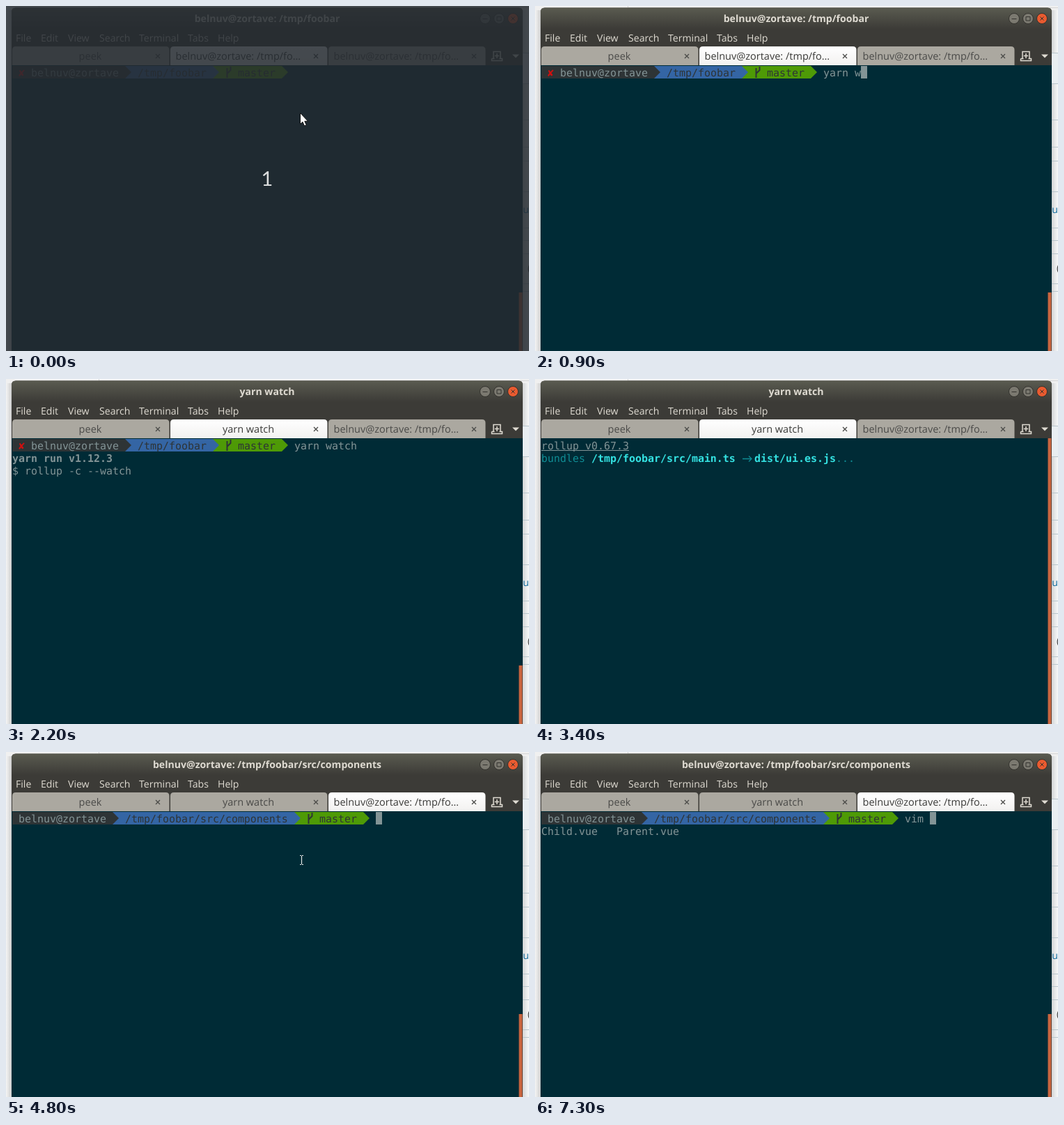
These frames come from a looping animation (751x495 px, 8000 ms). An HTML page:

```html
<!DOCTYPE html>
<html lang="en">
<head>
<meta charset="utf-8">
<title>Terminal session</title>
<style>
  html, body { margin: 0; width: 100%; height: 100%; overflow: hidden; background: #fdfdfd; }
  svg { display: block; width: 751px; height: 495px; }
  text { white-space: pre; text-rendering: geometricPrecision; }
  .ui { font: 14.1px "Open Sans", "Noto Sans", sans-serif; fill: #dfdbd2; }
  .title { font-weight: 700; text-anchor: middle; }
  .tab { font-size: 14.5px; fill: #4a4a48; }
  .on { fill: #3a3a38; }
  .mid { text-anchor: middle; }
  .count { font: 29px Lato, sans-serif; fill: #dcdedf; }
  .mono { font: 14.95px "DejaVu Sans Mono", monospace; fill: #839496; }
  .bold { font-weight: 700; }
</style>
</head>
<body>
<svg viewBox="0 0 751 495">
  <defs>
    <linearGradient id="bar" x2="0" y2="1">
      <stop offset="0" stop-color="#5a5b50"/><stop offset="1" stop-color="#3c3b37"/>
    </linearGradient>
    <linearGradient id="active" x2="0" y2="1">
      <stop offset="0" stop-color="#fff"/><stop offset="1" stop-color="#f2f1f0"/>
    </linearGradient>
    <linearGradient id="shadeL">
      <stop offset="0" stop-color="#f4f4f4"/><stop offset="1" stop-color="#cfcfcf"/>
    </linearGradient>
    <linearGradient id="shadeR">
      <stop offset="0" stop-color="#d4d6d7"/><stop offset="1" stop-color="#f7f8f8"/>
    </linearGradient>
  </defs>

  <rect width="751" height="495" fill="#f0f0f0"/>
  <path d="M133.500 0V2.500H751" fill="none" stroke="#d4d4d4"/>
  <rect y="6" width="8" height="489" fill="url(#shadeL)"/>
  <rect x="742" y="6" width="9" height="489" fill="url(#shadeR)"/>
  <g id="page"></g>
  <text class="ui" x="735.500" y="297" style="fill:#0b6a9c">su</text>
  <text class="ui" x="749" y="381" style="fill:#444">(</text>

  <path d="M8 495V8.500q0-6 6-6H736q6 0 6 6V495z" fill="#3c3b37"/>
  <path d="M8 33V8.500q0-6 6-6H736q6 0 6 6V33z" fill="url(#bar)"/>
  <g stroke="#33322e">
    <circle cx="688" cy="18" r="7.500" fill="#7b7970"/>
    <circle cx="708" cy="18" r="7.500" fill="#7b7970"/>
    <circle cx="728" cy="18" r="7.500" fill="#ea5b30"/>
    <path d="M684.500 18.500h7M705 15.500h6v5.500h-6zM725.500 15.500l5 5m0-5l-5 5" fill="none"/>
  </g>
  <g fill="none" stroke="#dfdbd2" stroke-width="1.500">
    <path d="M700 76V65.500h10V76M697.500 75.500v3h15v-3h-4M697.500 75.500h4M705 68v7M701.800 71.500h6.400"/>
    <path d="M727 69.500h10l-5 5z" fill="#dfdbd2" stroke="none"/>
  </g>
  <g id="tabs"></g>
  <rect x="8" y="85" width="734" height="410" fill="#002b36"/>
  <g id="screen"></g>
  <g id="head"></g>
  <g id="veil">
    <rect width="751" height="495" fill="#252b31" opacity=".85"/>
    <text x="375" y="258" class="count mid">1</text>
  </g>
  <g id="pointer"></g>
</svg>

<script>
const $ = id => document.getElementById(id);
const LOOP = 8000, CELL = 9, LINE = 18, LEFT = 9, TOP = 86;
const USER = 'belnuv@zortave';
const GREY = '#839496', DARK = '#2e3436', BLUE = '#3465a4', GREEN = '#4e9a06',
      TEAL = '#0f8c94', CYAN = '#34e2e2', LIME = '#8ae234';
const colX = c => LEFT + c * CELL;
const rowY = r => TOP + r * LINE;

const label = (x, y, s, cls = '') => `<text class="ui ${cls}" x="${x}" y="${y}">${s}</text>`;
const mono = (col, row, s, fill = GREY, cls = '') =>
  `<text class="mono ${cls}" x="${colX(col)}" y="${rowY(row) + 15}" style="fill:${fill}">${s}</text>`;
const rect = (x, y, w, h, fill) =>
  `<rect x="${x}" y="${y}" width="${w}" height="${h}" fill="${fill}"/>`;

// Prompt segment: a box that ends in an arrow tip one cell wide
const segment = (from, to, fill) => {
  const a = colX(from), b = colX(to);
  return `<path d="M${a} ${TOP}H${b}l9 9l-9 9H${a}z" fill="${fill}"/>`;
};

function prompt(path, failed) {
  const name = failed ? 3 : 1;
  const dir = name + USER.length + 3;
  const git = dir + path.length + 3;
  const x = colX(git);
  const svg = segment(0, git + 9, GREEN) + segment(0, git - 2, BLUE) + segment(0, dir - 2, DARK) +
    (failed ? mono(1, 0, '✘', '#d01010', 'bold') : '') +
    mono(name, 0, USER) + mono(dir, 0, path, DARK) + mono(git + 2, 0, 'master', DARK) +
    `<path d="M${x + 2.5} 103V89m5-2v5l-5 5" fill="none" stroke="${DARK}" stroke-width="2"/>`;
  return { svg, end: git + 11 };
}

const root = prompt('/tmp/foobar', true);
const comp = prompt('/tmp/foobar/src/components', false);

// Prompt with typed text; the cursor follows the text
const typed = (p, s, more = '') => ({ body: p.svg + mono(p.end, 0, s) + more, cur: [p.end + s.length, 0] });
const ran = root.svg + mono(root.end, 0, 'yarn watch');
const run = mono(0, 1, 'yarn run v1.12.3', GREY, 'bold') + mono(0, 2, '$ rollup -c --watch');
const header = mono(0, 0, 'rollup v0.67.3') + rect(LEFT, 102, 14 * CELL, 1, GREY);
const bundles = header + mono(0, 1, 'bundles', TEAL) +
  mono(8, 1, '/tmp/foobar/src/main.ts', CYAN, 'bold') +
  `<path d="M298 114.500h13m-4-4l4 4l-4 4" fill="none" stroke="${TEAL}" stroke-width="1.300"/>` +
  mono(34, 1, 'dist/ui.es.js', CYAN, 'bold') + mono(47, 1, '...', TEAL);
const created = bundles + mono(0, 2, 'created', GREEN) + mono(8, 2, 'dist/ui.es.js', LIME, 'bold') +
  mono(22, 2, 'in', GREEN) + mono(25, 2, '1.6s', LIME, 'bold') +
  mono(0, 4, '[2018-11-30 11:06:53] waiting for changes...');
const files = mono(0, 1, 'Child.vue') + mono(12, 1, 'Parent.vue');

// Each step overrides parts of the state before it
const steps = [
  [0, { title: USER + ': /tmp/foobar', second: '', tab: 1, thumb: 411, body: root.svg, cur: null,
        pointer: 'arrow', dim: true, keys: false }],
  [100, { dim: false, pointer: 'beam' }],
  [300, { ...typed(root, ''), pointer: '' }],
  [400, typed(root, 'y')],
  [500, typed(root, 'ya')],
  [700, typed(root, 'yarn')],
  [900, typed(root, 'yarn w')],
  [1000, typed(root, 'yarn wa')],
  [1200, typed(root, 'yarn wat')],
  [1400, typed(root, 'yarn watc')],
  [1500, typed(root, 'yarn watch')],
  [1700, { body: ran, cur: [0, 1] }],
  [1800, { title: 'yarn watch', second: 'yarn watch' }],
  [1900, { body: ran + run, cur: [0, 3] }],
  [2200, { cur: null }],
  [2700, { body: header, cur: [0, 1], thumb: 85 }],
  [2800, { body: bundles, cur: [0, 2] }],
  [3400, { cur: null }],
  [4500, { body: created, cur: [0, 5] }],
  [4800, { ...typed(comp, ''), title: USER + ': /tmp/foobar/src/components', tab: 2, thumb: 376, pointer: 'beam' }],
  [4900, { keys: true }],
  [5100, { keys: false }],
  [5400, { cur: null }],
  [6000, typed(comp, '')],
  [6500, { pointer: '' }],
  [6600, typed(comp, 'v')],
  [6700, typed(comp, 'vi')],
  [6900, typed(comp, 'vim')],
  [7100, typed(comp, 'vim ')],
  [7300, typed(comp, 'vim ', files)],
];
let last = {};
const scenes = steps.map(([at, change]) => ({ at, ...(last = { ...last, ...change }) }));

const menu = [['File', 14], ['Edit', 50], ['View', 89], ['Search', 134], ['Terminal', 191], ['Tabs', 261], ['Help', 304]];
const pointers = {
  '': '',
  arrow: '<path d="M422.500 153.500v16l3.500-3.200l2.500 5.700l2.800-1.200l-2.500-5.500h4.700z" fill="#fff" stroke="#111"/>',
  beam: '<path d="M422 148.500h2m1 0h2M424.500 149v12M422 161.500h2m1 0h2" fill="none" stroke="#e4e6e4" stroke-width="1.200"/>',
};

function tabs({ tab, second }) {
  const shell = USER + ': /tmp/fo…';
  return ['peek', second, shell].map((s, i) => {
    const x = 9 + i * 227, on = i === tab, cls = on ? 'tab on' : 'tab';
    const shape = `<path d="M${x} 85V63q0-5 5-5h215.500q5 0 5 5V85z" fill="${on ? 'url(#active)' : '#aba8a0'}"/>`;
    const text = s && s !== shell ? label(x + 112, 77, s, cls + ' mid') : label(x + 7.5, 77, shell, cls);
    const cross = `<path d="M${x + 206} 69l6 6m0-6l-6 6" stroke="#4a4a48" stroke-width="1.300"/>`;
    return shape + text + cross;
  }).join('');
}

function show(s) {
  $('veil').style.display = s.dim ? '' : 'none';
  $('tabs').innerHTML = tabs(s);
  $('screen').innerHTML = rect(736.5, s.thumb, 5, 495 - s.thumb, '#c9653f') + s.body +
    (s.cur ? rect(colX(s.cur[0]), rowY(s.cur[1]), CELL, LINE, GREY) : '');
  const marks = [14, 50, 89, 134, 191, 277, 304];
  $('head').innerHTML = label(375, 23, s.title, 'title') +
    menu.map(([word, x]) => label(x, 51, word)).join('') +
    (s.keys ? marks.map(x => rect(x, 52, 9, 1, '#dfdbd2')).join('') : '');
  $('pointer').innerHTML = pointers[s.pointer];
}

$('page').innerHTML = rect(742, 67, 9, 44, '#e9eef1') +
  [67, 111, 163, 202, 222, 266, 318, 336, 355, 398, 409].map(y => rect(742, y, 9, 1, '#b9c6cc')).join('');

let shown;
function tick() {
  const t = performance.now() % LOOP;
  const scene = scenes.findLast(s => s.at <= t);
  if (scene !== shown) show(shown = scene);
  requestAnimationFrame(tick);
}
tick();
</script>
</body>
</html>
```
